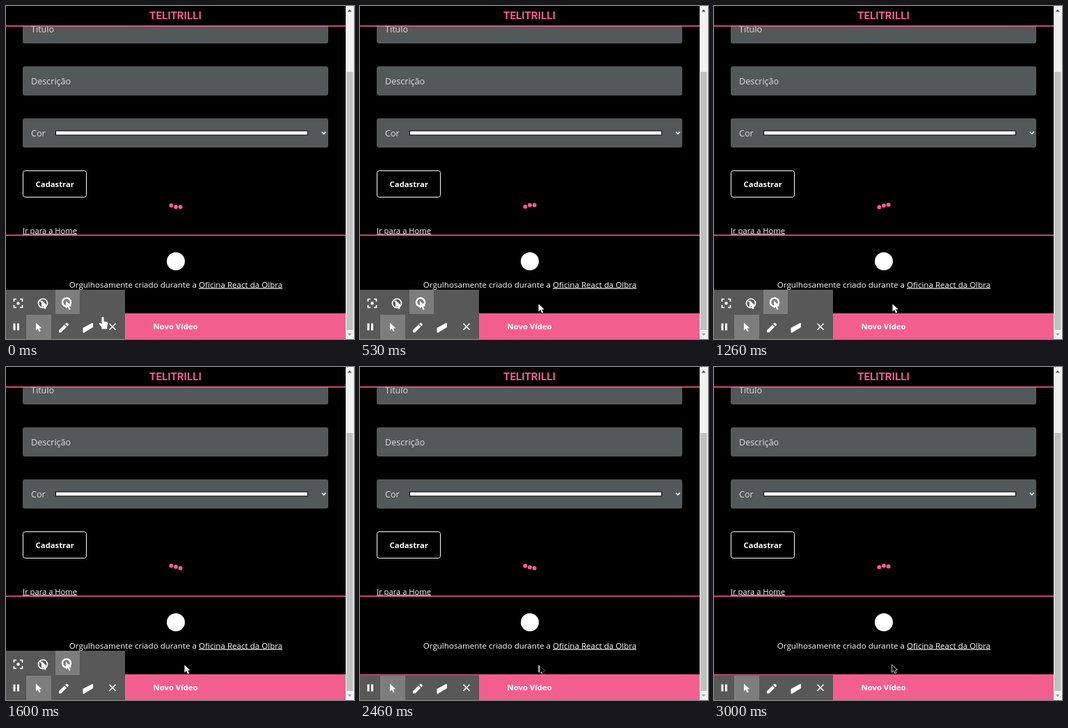
Write an HTML page that moves like this. It is 500 by 480 pixels and loops after 3060 ms.

```html
<!DOCTYPE html>
<html lang="pt-BR">
<head>
<meta charset="utf-8">
<style>
  html, body { margin: 0; width: 100%; height: 100%; overflow: hidden; background: #000; }
  svg { display: block; width: 500px; height: 480px; }
  text { font-family: "Open Sans", "Noto Sans", sans-serif; font-size: 11.6px; fill: #fff; }
  .label { font-size: 12.6px; fill: #dcdcdc; }
  .bold { font-size: 11.3px; font-weight: 700; }
  .title { font: 700 15.2px Roboto, sans-serif; }
  .pink { fill: #f25f8f; }
  .field { fill: #53585a; }
  .bar { fill: #585858; }
  .active { fill: #7d7d7d; }
  .line { fill: none; stroke: #fff; stroke-width: 2; }
  .link { text-decoration: underline; text-decoration-thickness: 1px; text-underline-offset: 1.5px; }
</style>
</head>
<body>
<svg viewBox="0 0 500 480">
  <defs>
    <path id="arrow" d="M0 0V11L2.7 8.6 4.6 13 6.7 12 4.8 8 8.2 7.7Z"/>
  </defs>
  <rect width="500" height="480"/>

  <!-- Form -->
  <rect class="field" x="24" y="12" width="439" height="42" rx="3"/>
  <rect class="field" x="24" y="87" width="439" height="42" rx="3"/>
  <rect class="field" x="24" y="162" width="439" height="42" rx="3"/>
  <text class="label" x="36" y="37.5">Título</text>
  <text class="label" x="36" y="112.5">Descrição</text>
  <text class="label" x="36" y="187.5">Cor</text>
  <rect x="71.5" y="180" width="362" height="6" fill="#fff" stroke="#000"/>
  <path class="line" d="M453.8 181.4l2.9 2.9 2.9-2.9" style="stroke-width:1.6"/>
  <rect x="24.5" y="237.5" width="91" height="38" rx="3" fill="#000" stroke="#fff"/>
  <text class="bold" x="70.3" y="260.5" text-anchor="middle">Cadastrar</text>
  <g id="dots" class="pink">
    <circle r="3" cx="237.4"/><circle r="3" cx="244"/><circle r="3" cx="250.6"/>
  </g>
  <text class="link" x="24" y="327.5" style="font-size:11.2px">Ir para a Home</text>

  <!-- Header and footer -->
  <rect width="488" height="28"/>
  <rect class="pink" y="28" width="488" height="1.6"/>
  <text class="title pink" x="243.5" y="19" text-anchor="middle">TELITRILLI</text>
  <rect class="pink" y="329.6" width="488" height="1.6"/>
  <circle cx="244" cy="368" r="13" fill="#fff"/>
  <text x="244" y="405.5" text-anchor="middle">Orgulhosamente criado durante a <tspan class="link">Oficina React da Olbra</tspan></text>
  <rect class="pink" y="443" width="488" height="37"/>
  <text class="bold" x="243.5" y="466" text-anchor="middle">Novo Vídeo</text>

  <!-- Scrollbar -->
  <rect x="488" width="12" height="480" fill="#f1f1f1"/>
  <rect x="489" y="95" width="9.5" height="372" fill="#c1c1c1"/>
  <path d="M490.7 8.3h6l-3-3.3z" fill="#505050"/>
  <path d="M490.7 472h6l-3 3.3z" fill="#a3a3a3"/>

  <!-- Recording tools -->
  <g id="tools">
    <rect class="bar" y="409" width="171" height="36"/>
    <rect class="active" x="71" y="409" width="35" height="35"/>
    <path class="line" d="M11.5 426v-3.5h3.5M20 422.500h3.5v3.500M23.500 431v3.500h-3.500M15 434.500h-3.500v-3.500" style="stroke-width:1.700"/>
    <circle cx="17.500" cy="428.500" r="2.200" fill="#fff"/>
    <circle class="line" cx="53" cy="428.500" r="6.500" style="stroke-width:1.700"/>
    <path class="line" d="M48.500 424l9 9" style="stroke-width:1.500"/>
    <use href="#arrow" x="51" y="424" fill="#fff"/>
    <circle class="line" cx="87" cy="427" r="6" style="stroke-width:2.500"/>
    <use href="#arrow" x="86" y="425" fill="#fff"/>
  </g>
  <rect class="bar" y="444" width="171" height="36"/>
  <rect class="active" x="29" y="445" width="36" height="35"/>
  <path d="M10.500 457.500h3v10h-3zM16 457.500h3v10h-3z" fill="#fff"/>
  <use href="#arrow" x="43" y="456.500" fill="#fff"/>
  <path d="M76 470.500v-3.200l8-8 3.200 3.200-8 8zM85 458.300l1.400-1.400q.8-.6 1.600.1l1.600 1.600q.7.800 0 1.600l-1.400 1.300z" fill="#fff"/>
  <path d="M110.500 464l13.500-7.300 1 .8v5.500l-13.500 8.200-1-1z" fill="#fff"/>
  <path class="line" d="M148.500 457.800l9 9M157.500 457.800l-9 9" style="stroke-width:1.600"/>

  <!-- Pointers -->
  <path id="hand" fill="#fff" d="M-1.500 1Q0-1 1.500 1V6.500L6 7.600Q7.500 8 7.300 10L6.300 14V17.500H-1.500V15L-5 10.500Q-5.500 8.500-3.500 8.800L-1.500 10.500Z"/>
  <use id="pointer" href="#arrow" fill="#fff"/>
  <use id="darkPointer" href="#arrow" stroke="#d8d8d8" stroke-width=".9"/>
</svg>
<script>
  const LOOP = 3060;
  const byId = id => document.getElementById(id);
  const [tools, hand, pointer, darkPointer] =
    ["tools", "hand", "pointer", "darkPointer"].map(byId);
  const dots = [...byId("dots").children];

  const show = (el, on) => el.setAttribute("display", on ? "inline" : "none");
  const place = (el, x, y) => el.setAttribute("transform", `translate(${x} ${y})`);

  // Snap to 15 pictures per second, in whole hundredths of a second.
  function snap(ms) {
    const step = Math.ceil(3 * (Math.floor(ms / 10) + 1) / 20) - 1;
    return Math.floor(step * 20 / 3) * 10;
  }

  function drawDots(t) {
    const phase = t < 530 ? 40 - 0.347 * t : 95 - 0.447 * t;
    dots.forEach((dot, i) => {
      const angle = (phase + (1 - i) * 80) * Math.PI / 180;
      dot.setAttribute("cy", 288.3 + 1.8 * Math.cos(angle));
    });
  }

  function drawPointer(t) {
    const p = Math.min(1, Math.max(0, t / 400));
    const ease = p * p * (3 - 2 * p);
    const x = 139 + 117.500 * ease;
    const y = 448 - 18.500 * ease;
    const overTools = x < 171;
    place(hand, x, y);
    place(pointer, x, y);
    show(hand, overTools);
    show(pointer, !overTools && t < 2530);

    const settled = t >= 2530;
    show(darkPointer, t >= 2460);
    place(darkPointer, settled ? 255.500 : 258, settled ? 429 : 430.500);
    darkPointer.setAttribute("stroke-opacity", settled ? 1 : 0.4);
  }

  function draw(now) {
    const t = snap(now % LOOP);
    drawDots(t);
    drawPointer(t);
    show(tools, t < 1800);
  }

  const start = performance.now();
  function tick() {
    draw(performance.now() - start);
    requestAnimationFrame(tick);
  }
  tick();
</script>
</body>
</html>
```
